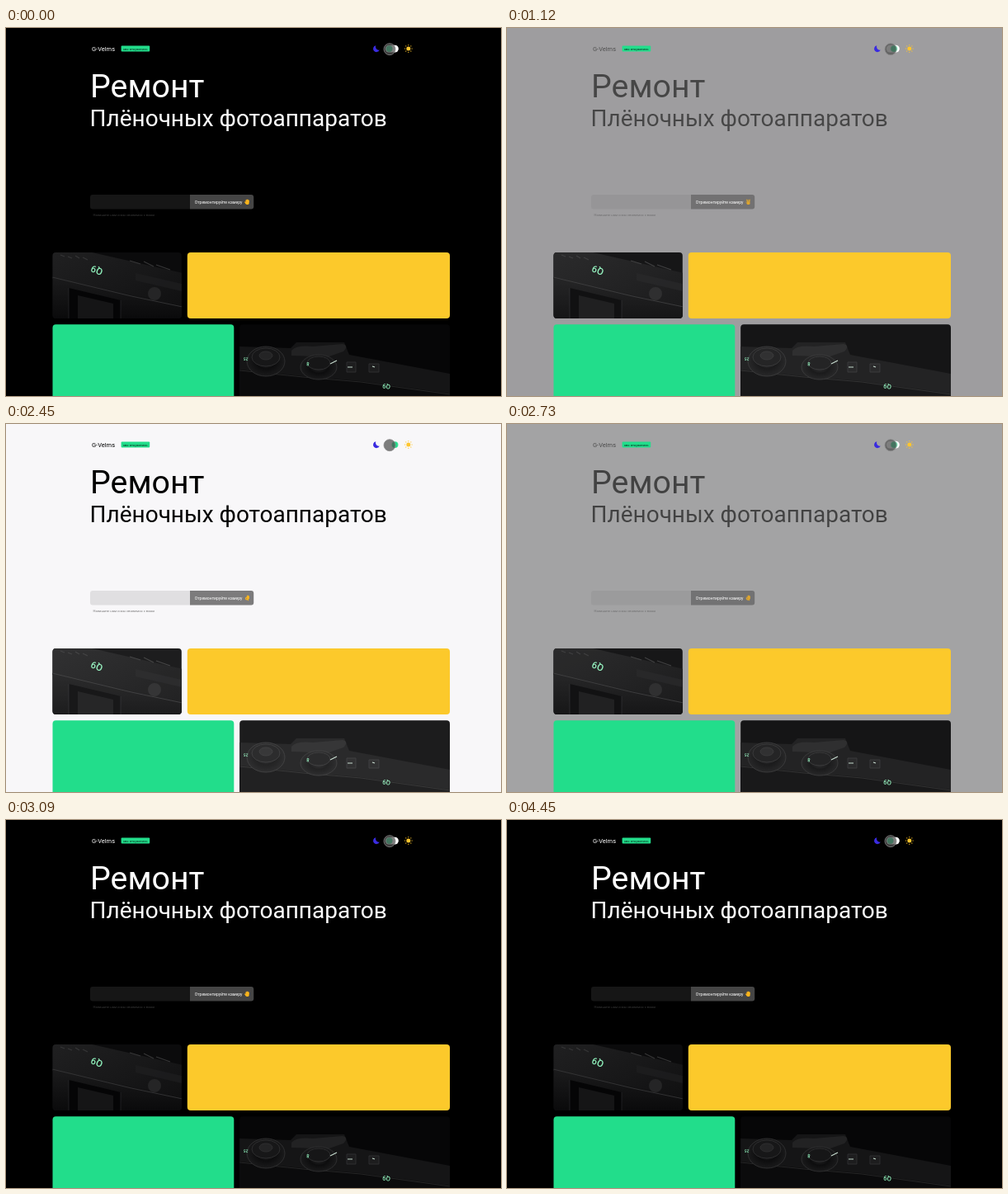
These frames come from a looping animation (600 px wide and 446 px high, 4.48 s). An HTML page:

```html
<!DOCTYPE html>
<html lang="ru">
<head>
<meta charset="utf-8">
<title>Ремонт плёночных фотоаппаратов</title>
<style>
  html, body { margin: 0; width: 100%; height: 100%; overflow: hidden; background: #000; }
  svg { display: block; width: 100%; height: 100%; }
  text { font-family: Roboto, Arial, sans-serif; }

  .page, .dark, .light, .knob, .victory, .ok {
    animation: 4480ms ease infinite;
  }
  .page { animation-name: page; }
  .dark { animation-name: dark; color: #fff; }
  .light { animation-name: light; color: #000; }
  .knob { animation-name: knob; }
  .victory { animation-name: victory; animation-timing-function: step-end; }
  .ok { animation-name: ok; animation-timing-function: step-end; }

  @keyframes page {
    0%, 22.545%, 66.183%, 100% { fill: #000; }
    29.241%, 59.487% { fill: #f8f7f9; }
  }
  @keyframes dark {
    0%, 22.545%, 66.183%, 100% { opacity: 1; }
    29.241%, 59.487% { opacity: 0; }
  }
  @keyframes light {
    0%, 22.545%, 66.183%, 100% { opacity: 0; }
    29.241%, 59.487% { opacity: 1; }
  }
  @keyframes knob {
    0%, 22.545%, 66.183%, 100% { transform: translateX(0); }
    29.241%, 59.487% { transform: translateX(6.8px); }
  }
  @keyframes victory {
    0%, 43.5%, 100% { opacity: 1; }
    43.5% { opacity: 0; }
  }
  @keyframes ok {
    0%, 100% { opacity: 0; }
    43.5% { opacity: 1; }
  }

  .hand { fill: none; stroke: #fdb51c; stroke-linecap: round; stroke-linejoin: round; stroke-width: 1.15; }
  .hand .fill { fill: #fdb51c; stroke: none; }
  .edge { fill: none; stroke: #3a3a3b; stroke-width: .8; }
  .glow { fill: #8ff0bb; font-weight: 500; text-anchor: middle; }
</style>
</head>
<body>
<svg viewBox="0 0 600 446" preserveAspectRatio="none">
  <defs>
    <clipPath id="leftClip"><rect x="56.5" y="272" width="156.3" height="80" rx="4"/></clipPath>
    <clipPath id="rightClip"><rect x="283.2" y="359.2" width="254.8" height="100" rx="4"/></clipPath>
    <linearGradient id="plate" x1="0" y1="0" x2="1" y2="1">
      <stop offset="0" stop-color="#202021"/>
      <stop offset=".55" stop-color="#171718"/>
      <stop offset="1" stop-color="#0e0e0f"/>
    </linearGradient>
    <linearGradient id="front" x1="0" y1="0" x2="0" y2="1">
      <stop offset="0" stop-color="#1b1b1c"/>
      <stop offset="1" stop-color="#0a0a0b"/>
    </linearGradient>
    <radialGradient id="dial">
      <stop offset="0" stop-color="#29292a"/>
      <stop offset=".5" stop-color="#0d0d0e"/>
      <stop offset="1" stop-color="#1a1a1b"/>
    </radialGradient>
    <g id="copy" fill="currentColor">
      <text x="104" y="27.6" font-size="7.5">G-Velms</text>
      <text x="102" y="84.3" font-size="39.3">Ремонт</text>
      <text x="101.5" y="119.4" font-size="28">Плёночных фотоаппаратов</text>
    </g>
    <text id="hint" x="105.5" y="228.2" font-size="4.16" fill="currentColor">Напишите нам и мы свяжемся с вами</text>
    <path id="field" d="M223 202V219.6H105a3 3 0 0 1-3-3V205a3 3 0 0 1 3-3z"/>
    <path id="button" d="M223 202H297.2a3 3 0 0 1 3 3V216.6a3 3 0 0 1-3 3H223z"/>
  </defs>

  <rect class="page" width="600" height="446"/>

  <!-- theme layers -->
  <g class="dark">
    <use href="#copy"/>
    <use href="#hint" opacity=".22"/>
    <use href="#field" fill="#fff" opacity=".085"/>
    <use href="#button" fill="#fff" opacity=".27"/>
  </g>
  <g class="light">
    <use href="#copy"/>
    <use href="#hint" opacity=".52"/>
    <use href="#field" fill="#000" opacity=".095"/>
    <use href="#button" fill="#000" opacity=".5"/>
  </g>

  <rect x="139.6" y="21.6" width="34.6" height="7" rx="1" fill="#22dd8b"/>
  <text x="142.2" y="26.6" font-size="4.25" fill="#06251a">мы открылись</text>

  <!-- theme switch -->
  <path d="M448.3 21.2a4 4 0 1 0 4.5 5.3a3.8 3.8 0 0 1-4.5-5.3z" fill="#3a2be0"/>
  <g stroke="#ffc62e" stroke-width="1.1" stroke-linecap="round">
    <circle cx="487.8" cy="25" r="2.5" fill="#ffc62e" stroke="none"/>
    <path d="M487.8 20.6v.2M487.8 29.2v.2M483.4 25h.2M492 25h.2M484.7 21.9l.1.1M490.8 28l.1.1M484.7 28.1l.1-.1M490.8 22l.1-.1"/>
  </g>
  <rect x="459.8" y="20.8" width="16" height="8.6" rx="4.3" fill="#fff"/>
  <circle class="knob" cx="464.6" cy="25.1" r="3.9" fill="#22dd8b"/>
  <circle cx="465" cy="25.7" r="7" fill="#505050" fill-opacity=".74" stroke="#888" stroke-opacity=".8" stroke-width="1"/>

  <!-- request button -->
  <text x="228.7" y="212.8" font-size="5.06" fill="#fff">Отремонтируйте камеру</text>
  <g class="hand">
    <g class="dark">
      <rect class="fill" x="290.5" y="210.4" width="4.1" height="3.6" rx="1.4"/>
      <path d="M291 211V208.9M292.1 210.5V208.1M293.2 210.5V208.2M294.2 211V209M290.8 212.6L289.7 211"/>
    </g>
    <g class="light">
      <g class="victory">
        <rect class="fill" x="290.7" y="210.6" width="3.7" height="3.4" rx="1.3"/>
        <path d="M291.8 211L290.7 208.1M293.2 211L294.2 208.1"/>
      </g>
      <g class="ok">
        <circle cx="291.7" cy="211.6" r="1.2"/>
        <path d="M292.4 210.5V208.2M293.3 210.8V208M294.3 211.4V208.8M293.3 211.5V213.6"/>
      </g>
    </g>
  </g>

  <!-- cards -->
  <rect x="219.8" y="272" width="318.2" height="80" rx="4" fill="#fcc92b"/>
  <rect x="56.5" y="359.2" width="219.8" height="100" rx="4" fill="#22dd8b"/>

  <g clip-path="url(#leftClip)">
    <rect x="56" y="271" width="158" height="82" fill="#0b0b0c"/>
    <path d="M56 271H100L214 297V352L56 304z" fill="url(#plate)"/>
    <path d="M56 302L214 336V353H56z" fill="url(#front)"/>
    <path class="edge" d="M56 302L152 325L214 338"/>
    <path d="M76 315L139 330V353H76z" fill="#050506"/>
    <path d="M87 324L130 334V353H87z" fill="#151516"/>
    <path class="edge" d="M76 315V353M139 330V353" opacity=".6"/>
    <path d="M66 275l5 2m4 0l5 2m4-3l5 3m4-1l6 3M150 282l13 4m4-3l12 6m3-2l17 6" fill="none" stroke="#353536" stroke-width="1.2"/>
    <path d="M157 297L213 310V319L157 306z" fill="#1f1f20" opacity=".7"/>
    <circle cx="180" cy="322" r="8" fill="#252526"/>
    <text class="glow" font-size="11.5" transform="translate(111.5 289.8) rotate(201)">Q9</text>
    <rect class="light" x="56" y="271" width="158" height="82" fill="#fff" fill-opacity=".075"/>
  </g>

  <g clip-path="url(#rightClip)">
    <rect x="283" y="359" width="256" height="90" fill="#060607"/>
    <path d="M283 386L345 388L352 381H410L416 396L538 419V449H283z" fill="#151516"/>
    <path d="M283 414L360 422L430 428L538 443V449H283z" fill="#0b0b0c"/>
    <path class="edge" d="M283 415L360 423L430 429L538 444" opacity=".7"/>
    <path d="M346 391Q352 384 372 386L408 383Q416 385 409 392L386 400Q368 397 346 397z" fill="#222223"/>
    <g stroke="#303031" stroke-width=".9">
      <ellipse cx="315" cy="404" rx="23" ry="18" fill="url(#dial)"/>
      <ellipse cx="315" cy="399" rx="17" ry="11" fill="#171718"/>
      <ellipse cx="315" cy="397" rx="8" ry="5" fill="#242425"/>
      <ellipse cx="379" cy="411" rx="22" ry="15" fill="url(#dial)"/>
      <ellipse cx="379" cy="406" rx="14" ry="8" fill="#161617"/>
      <path d="M413 405h11v12h-11zM440 407h12v10h-12z" fill="#1d1d1e"/>
    </g>
    <path d="M393 407l8-4M414 411h6M444 410l3 1" fill="none" stroke="#c4d9cc" stroke-width="1.2"/>
    <text class="glow" font-size="5" transform="translate(291 399.4) rotate(188)">25</text>
    <text class="glow" font-size="6" transform="translate(366 405) rotate(185)">8</text>
    <text class="glow" font-size="7.8" transform="translate(461.5 431.6) rotate(187)">Q9</text>
    <rect class="light" x="283" y="359" width="256" height="90" fill="#fff" fill-opacity=".09"/>
  </g>
</svg>
</body>
</html>
```
